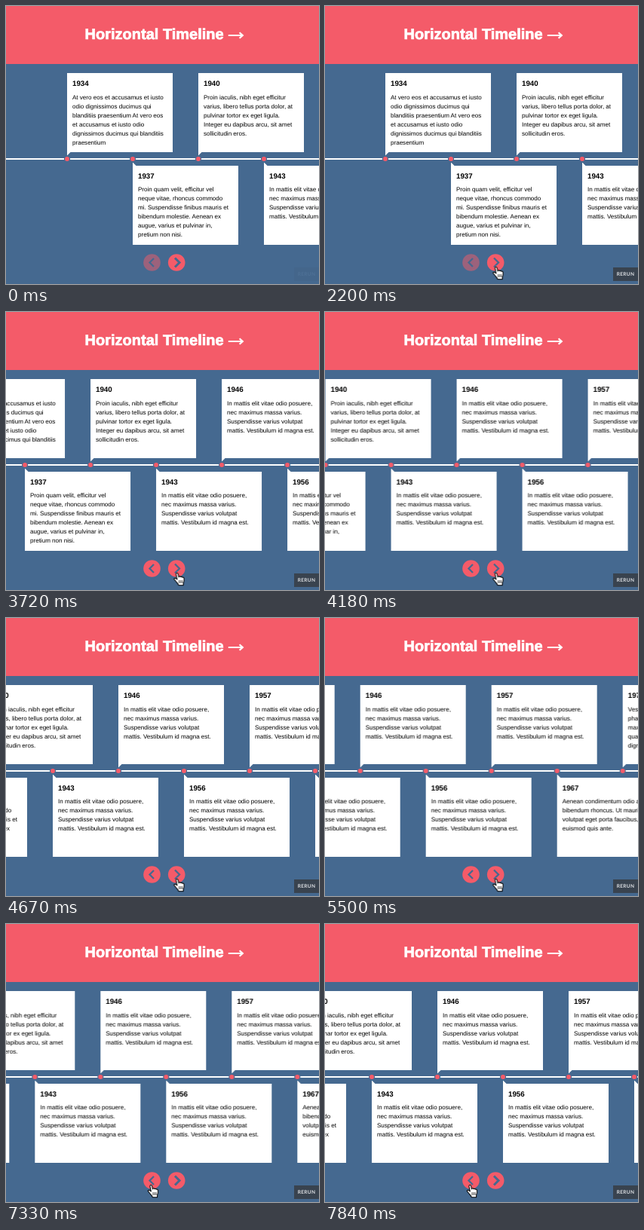
Animation of 415 by 369 pixels, one loop 7990 ms. Source, as an HTML page:

```html
<!DOCTYPE html>
<html lang="en">
<head>
<meta charset="utf-8">
<title>Horizontal Timeline</title>
<style>
:root { --pink: #f45b69; --blue: #456990; --loop: 7.99s linear infinite; }
* { box-sizing: border-box; margin: 0; padding: 0; }
html, body { width: 100%; height: 100%; overflow: hidden; background: var(--blue); }
body {
  position: relative;
  font: 8.06px/12px "Liberation Sans", Arial, sans-serif;
  text-rendering: geometricPrecision;
  white-space: nowrap;
  color: #000;
}
header { position: absolute; inset: 0 0 auto; height: 77px; background: var(--pink); }
h1 {
  position: absolute; left: 104.6px;
  font-size: 20px; line-height: 77px; color: #fff;
  -webkit-text-stroke: .7px #fff;
}

.track { position: absolute; left: 0; top: 0; animation: scroll var(--loop); will-change: transform; }
.line {
  position: absolute; left: -83px; top: 202px; width: 1131px; height: 2px;
  background: repeating-linear-gradient(90deg, #fff 0 79px, transparent 79px 87px);
}
.item { position: absolute; top: 0; }
.item::before {
  content: ""; position: absolute; left: -3px; top: 200px;
  width: 6px; height: 6px; border-radius: 50%; background: var(--pink);
}
.card { position: absolute; top: 89px; width: 140px; height: 105px; padding: 8.3px 7px 0; background: #fff; }
.card::after {
  content: ""; position: absolute; left: 0; top: 100%;
  width: 4.5px; height: 4.5px; background: #fff;
  clip-path: polygon(0 0, 100% 0, 0 100%);
}
.item:nth-child(odd) .card { top: 212px; padding-top: 7.5px; }
.item:nth-child(odd) .card::after { top: -4.5px; clip-path: polygon(0 0, 100% 100%, 0 100%); }
time { display: block; margin-bottom: 4px; font-size: 9.72px; line-height: 14.4px; font-weight: bold; }

.ui { position: absolute; left: 0; top: 0; overflow: hidden; }
.ui circle { fill: var(--pink); }
.chevron { fill: none; stroke: var(--blue); stroke-width: 2.3; }
.prev { animation: enable var(--loop); }
.next .chevron { animation: hover var(--loop); }
.rerun {
  position: absolute; left: 382px; top: 347px; width: 33px; height: 18px;
  background: #39434f; color: #dfe2e6;
  font: bold 6.5px/19.4px Lato, sans-serif; letter-spacing: .35px; text-align: center;
  animation: fade var(--loop);
}
.hand { animation: point var(--loop); }

@keyframes scroll {
  0%, 27.359% { transform: translateX(81px); animation-timing-function: ease; }
  39.374%, 46.133% { transform: translateX(-59px); animation-timing-function: ease; }
  58.148%, 63.605% { transform: translateX(-199px); animation-timing-function: ease; }
  75.62%, 85.382% { transform: translateX(-339px); animation-timing-function: ease; }
  97.397%, 100% { transform: translateX(-199px); }
}
@keyframes enable {
  0% { opacity: .5; animation-timing-function: step-end; }
  40.551%, 100% { opacity: 1; }
}
@keyframes hover {
  0% { stroke-width: 3; animation-timing-function: step-end; }
  16.2% { stroke-width: 2.3; animation-timing-function: step-end; }
  77.6%, 100% { stroke-width: 3; }
}
@keyframes fade {
  0%, 11.64% { opacity: .06; }
  15.2%, 100% { opacity: 1; }
}
@keyframes point {
  0%, 11.64% { transform: translate(240px, 371px); animation-timing-function: ease-out; }
  17.021%, 75.72% { transform: translate(221.6px, 345px); animation-timing-function: ease-in-out; }
  82.478%, 100% { transform: translate(187.1px, 345px); }
}
</style>
</head>
<body>
<header><h1>Horizontal Timeline</h1></header>
<div class="track" id="track"><div class="line"></div></div>
<div class="rerun">RERUN</div>
<svg class="ui" width="415" height="369" viewBox="0 0 415 369">
  <path d="M294.8 39H313M309.6 35.2L313.8 39L309.6 42.8" fill="none" stroke="#fff" stroke-width="2.2"/>
  <g class="prev">
    <circle cx="193.5" cy="340.5" r="11.3"/>
    <path class="chevron" d="M196 335L190.5 340.5L196 346"/>
  </g>
  <g class="next">
    <circle cx="226.2" cy="340.5" r="11.3"/>
    <path class="chevron" d="M224 334.5L230 340.5L224 346.5"/>
  </g>
  <g class="hand" stroke="#000" stroke-linejoin="round" stroke-linecap="round">
    <g transform="scale(1.06)">
      <path fill="#fff" d="M4.9 9.4L3.7 3.1C3.4 1.1 5.7 .8 6.1 2.6L7 6.5C7.1 5.2 9 5.1 9.4 6.4C9.8 5.5 11.3 5.7 11.5 6.9C12.2 6.4 13.5 6.8 13.6 8.2C13.9 10.4 13.7 11.7 12.9 13.4L12.7 16.7H6.8C6.3 14.9 4.6 13.5 3.4 11.8L1.4 9.4C.6 8.2 2.2 7.2 3.4 8.2Z"/>
      <path fill="none" stroke-width=".7" d="M7.5 10.8V13.8M9.4 10.8V13.8M11.3 10.8V13.8"/>
    </g>
  </g>
</svg>
<script>
const mattis = "In mattis elit vitae odio posuere,|nec maximus massa varius.|Suspendisse varius volutpat|mattis. Vestibulum id magna est.";
const items = [
  [1934, "At vero eos et accusamus et iusto|odio dignissimos ducimus qui|blanditiis praesentium At vero eos|et accusamus et iusto odio|dignissimos ducimus qui blanditiis|praesentium"],
  [1937, "Proin quam velit, efficitur vel|neque vitae, rhoncus commodo|mi. Suspendisse finibus mauris et|bibendum molestie. Aenean ex|augue, varius et pulvinar in,|pretium non nisi."],
  [1940, "Proin iaculis, nibh eget efficitur|varius, libero tellus porta dolor, at|pulvinar tortor ex eget ligula.|Integer eu dapibus arcu, sit amet|sollicitudin eros."],
  [1943, mattis],
  [1946, mattis],
  [1956, mattis],
  [1957, mattis],
  [1967, "Aenean condimentum odio a|bibendum rhoncus. Ut mauris felis,|volutpat eget porta faucibus,|euismod quis ante."],
  [1977, "Vestibulum porttitor lorem sed|pharetra dignissim. Nulla|maximus, dui a tristique iaculis,|quam dolor convallis enim, non|dignissim ligula ipsum a turpis."]
];
const spacing = 87;
document.getElementById("track").insertAdjacentHTML("beforeend", items.map(([year, text], i) =>
  `<div class="item" style="left:${i * spacing}px"><div class="card"><time>${year}</time>${text.replaceAll("|", "<br>")}</div></div>`
).join(""));
</script>
</body>
</html>
```
